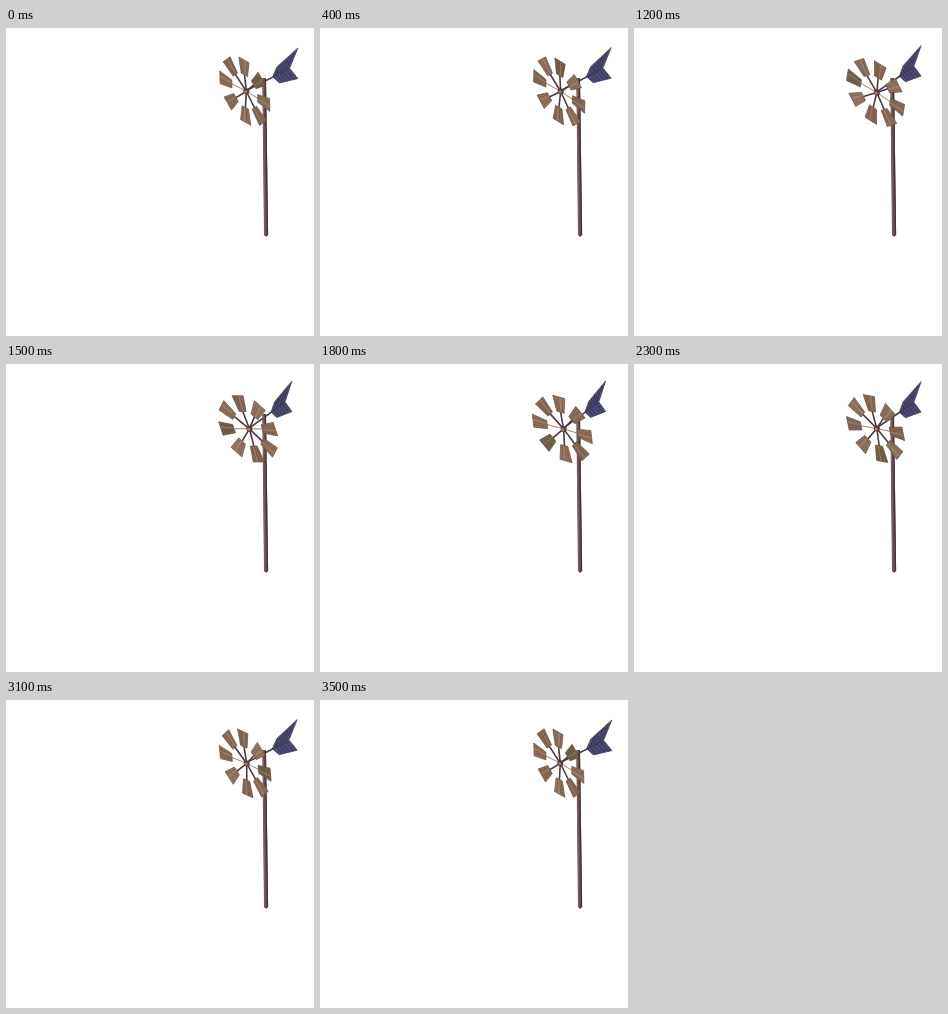
These frames come from a looping animation (308x308 px, 3.6 s). An HTML page with a canvas:

```html
<!DOCTYPE html>
<html>
<head>
<meta charset="utf-8">
<title>Windmill</title>
<style>
html, body { margin: 0; width: 100%; height: 100%; overflow: hidden; background: #fff; }
canvas { display: block; }
</style>
</head>
<body>
<canvas id="stage" width="308" height="308"></canvas>
<script>
const ctx = document.getElementById('stage').getContext('2d');
const RAD = Math.PI / 180, TAU = Math.PI * 2;
const STEP = 100, LOOP = 3600, LAST = 35;
const PITCH_SIN = 0.55, PITCH_COS = 0.835;
const PIVOT = [258, 53.5], ARM = 26, RADIUS = 29;
const WOOD = ['#6f6049', '#8f7360', '#876a58', '#947763', '#896d57', '#91725e', '#846959', '#957766'];

function shape(points, fill, edge) {
  ctx.beginPath();
  points.forEach(p => ctx.lineTo(...p));
  ctx.closePath();
  ctx.fillStyle = fill;
  ctx.fill();
  if (edge) {
    ctx.strokeStyle = edge;
    ctx.lineWidth = 0.7;
    ctx.stroke();
  }
}

function line(a, b, color, width) {
  ctx.beginPath();
  ctx.moveTo(...a);
  ctx.lineTo(...b);
  ctx.strokeStyle = color;
  ctx.lineWidth = width;
  ctx.stroke();
}

function dot([x, y], radius, color) {
  ctx.beginPath();
  ctx.arc(x, y, radius, 0, TAU);
  ctx.fillStyle = color;
  ctx.fill();
}

function drawTail(at) {
  line(at(-ARM, 0), at(34, 0), '#47354a', 1.6);
  const upper = [[12, 1], [17.5, 9.6], [46, 19.6], [35, 1]];
  const lower = [[12, 0], [21, -11], [46, -17], [35, 0]];
  for (const half of [upper, lower]) {
    const [root, front, tip, notch] = half.map(p => at(...p));
    shape([root, front, tip, notch], '#4b4a72', '#373350');
    for (const k of [0.2, 0.4, 0.6, 0.8]) {
      const mix = (p, q) => p.map((v, i) => v + (q[i] - v) * k);
      line(mix(root, notch), mix(front, tip), '#35324f', 0.8);
    }
  }
  line(at(17.5, 9.9), at(46, 19.9), '#9b8480', 0.6);
}

function drawPole() {
  shape([[256.3, 50], [260, 50], [262.2, 207], [260.2, 209], [258, 207]], '#624a4a');
  line([257.2, 51], [258.9, 207], '#83655d', 1);
  line([259.5, 51], [261.6, 207], '#40323a', 1);
}

function drawWheel(rim, hub, yaw, turn) {
  const side = [Math.cos(yaw), Math.sin(yaw) * PITCH_SIN];
  // r: along the blade, w: across it, in wheel radii
  const place = (angle, r, w) => {
    const c = Math.cos(angle), s = Math.sin(angle);
    const x = (r * c - w * s) * RADIUS, y = (r * s + w * c) * RADIUS;
    return [rim[0] + x * side[0], rim[1] + x * side[1] + y * PITCH_COS];
  };
  const blades = WOOD.map((color, i) => ({ color, angle: turn + i * TAU / 8 }));
  for (const { angle } of blades) {
    // level spokes catch the light
    const lit = Math.abs(Math.cos(angle)) > 0.92;
    line(hub, place(angle, 0.75, 0), lit ? '#a58272' : '#4f3840', lit ? 1 : 1.6);
  }
  for (const { color, angle } of blades) {
    shape([
      place(angle, 0.66, -0.16), place(angle, 1.27, -0.26),
      place(angle, 1.27, 0.26), place(angle, 0.66, 0.16)
    ], color, '#644e40');
    for (const k of [-0.6, -0.2, 0.2, 0.6])
      line(place(angle, 0.68, 0.16 * k), place(angle, 1.25, 0.26 * k), k === 0.2 ? '#a98c76' : '#6d5546', 0.6);
  }
  dot(hub, 3, '#553b39');
  dot([hub[0] - 0.7, hub[1] + 0.5], 1.6, '#a87f6b');
}

function draw(now) {
  const phase = Math.floor(now % LOOP / STEP) / LAST;
  const yaw = (42.2 + 5.3 * Math.cos(phase * TAU)) * RAD;
  const turn = 313 * RAD - phase * TAU;
  // point in the upright plane of the tail: a along the shaft, z up
  const at = (a, z) => [
    PIVOT[0] + a * Math.sin(yaw),
    PIVOT[1] - a * Math.cos(yaw) * PITCH_SIN - z * PITCH_COS
  ];
  ctx.fillStyle = '#fff';
  ctx.fillRect(0, 0, 308, 308);
  drawTail(at);
  drawPole();
  drawWheel(at(-ARM, 0), at(2 - ARM, -1), yaw, turn);
}

const start = performance.now();
function tick() {
  draw(performance.now() - start);
  requestAnimationFrame(tick);
}
tick();
</script>
</body>
</html>
```
